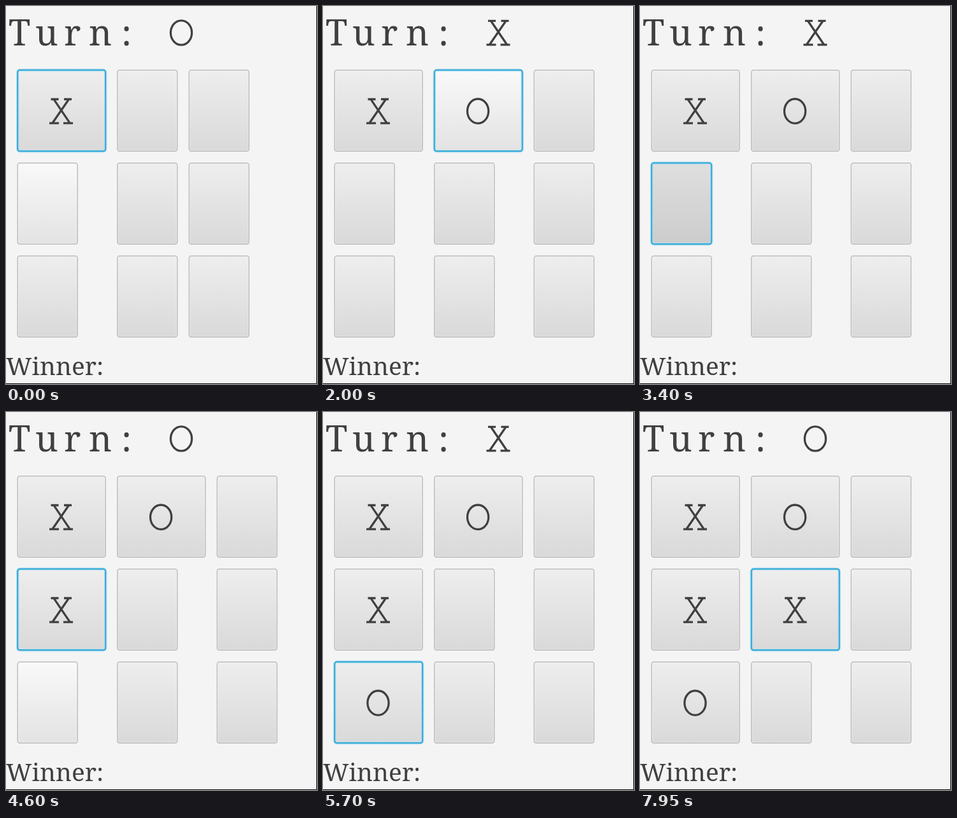
Animation of 488 by 594 pixels, one loop 8 s. Source, as an HTML page:

```html
<!DOCTYPE html>
<html lang="en">
<head>
<meta charset="utf-8">
<title>Tic-tac-toe</title>
<style>
  html, body { margin: 0; width: 100%; height: 100%; overflow: hidden; background: #f4f4f4; }
  svg { display: block; }
  text { font-family: "Noto Serif", serif; fill: #404040; }
  .turn { font-size: 56px; font-weight: 200; }
  .winner { font-size: 38.8px; }
  .mark { fill: none; stroke: #404040; stroke-width: 3.3; }
</style>
</head>
<body>
<svg width="488" height="594" viewBox="0 0 488 594">
  <defs>
    <linearGradient id="normal" x2="0" y2="1"><stop stop-color="#eeeeee"/><stop offset="1" stop-color="#d9d9d9"/></linearGradient>
    <linearGradient id="hover" x2="0" y2="1"><stop stop-color="#f9f9f9"/><stop offset="1" stop-color="#e3e3e3"/></linearGradient>
    <linearGradient id="pressed" x2="0" y2="1"><stop stop-color="#dfdfdf"/><stop offset="1" stop-color="#cccccc"/></linearGradient>
    <path id="X" class="mark" d="M-16-18.7h12M4.5-18.7h12M-18.5 18.9h15M3.5 18.9h15M-11.5-18.5L13.5 18.5M12-18.5L-13.5 18.5"/>
    <ellipse id="O" class="mark" rx="16.6" ry="19.2"/>
  </defs>
  <rect width="488" height="594" fill="#f4f4f4"/>
  <text class="turn" x="4 46 91 130 181" y="62">Turn:</text>
  <use id="turn" x="275" y="42"/>
  <g id="board"></g>
  <text class="winner" x="0" y="580">Winner:</text>
  <path d="M487.5 0V593.5H0" fill="none" stroke="#000"/>
</svg>
<script>
const LOOP = 8000;
const NARROW = 94, WIDE = 138, HEIGHT = 127.5;

// start time, cells, focused cell, cell under the pointer, pointer held down
const states = [
  [0,    'X........', 0, 3],
  [1050, 'X........', 0],
  [1150, 'X........', 0, 1],
  [1350, 'X........', 1, 1, true],
  [1450, 'XO.......', 1, 1],
  [2400, 'XO.......', 1],
  [2550, 'XO.......', 1, 3],
  [3400, 'XO.......', 3, 3, true],
  [3450, 'XO.X.....', 3, 3],
  [4000, 'XO.X.....', 3],
  [4600, 'XO.X.....', 3, 6],
  [4800, 'XO.X.....', 6, 6, true],
  [4950, 'XO.X..O..', 6, 6],
  [5350, 'XO.X..O..', 6],
  [5450, 'XO.X..O..', 6, 7],
  [5650, 'XO.X..O..', 6],
  [6900, 'XO.X..O..', 6, 4],
  [7750, 'XO.X..O..', 4, 4, true],
  [7850, 'XO.XX.O..', 4, 4],
  [7950, 'XO.XX.O..', 4]
];

const board = document.getElementById('board');
const turn = document.getElementById('turn');

function button(x, y, width, fill, focused, mark) {
  const box = (inset, attrs) =>
    `<rect x="${x + inset}" y="${y + inset}" width="${width - 2 * inset}" height="${HEIGHT - 2 * inset}" ${attrs}/>`;
  const border = focused
    ? box(0, 'rx="4" fill="none" stroke="#a9dcf0" stroke-opacity=".7" stroke-width="4.6"') +
      box(0, 'rx="3.5" fill="none" stroke="#36abd8" stroke-width="2.2"')
    : box(0, 'rx="3.5" fill="none" stroke="#bdbdbd" stroke-width="1.5"');
  const symbol = mark === '.' ? '' :
    `<use href="#${mark}" x="${x + width / 2 - .7}" y="${y + 64.5}"/>`;
  return box(0, `rx="4" fill="url(#${fill})"`) +
    box(1.2, 'rx="3" fill="none" stroke="#fff" stroke-opacity=".4"') + border + symbol;
}

function draw([, cells, focus, hover, down]) {
  const marked = [...cells].filter(c => c !== '.').length;
  turn.setAttribute('href', marked % 2 ? '#O' : '#X');
  const lastColumn = cells[1] + cells[4] + cells[7] === '...' ? 287.3 : 331.3;
  const columns = [18.2, 174.8, lastColumn];
  board.innerHTML = [...cells].map((mark, i) => {
    const fill = i !== hover ? 'normal' : down ? 'pressed' : 'hover';
    return button(columns[i % 3], 100.7 + 146 * Math.floor(i / 3),
      mark === '.' ? NARROW : WIDE, fill, i === focus, mark);
  }).join('');
}

let shown;
function frame() {
  const time = performance.now() % LOOP;
  const state = states.findLast(s => s[0] <= time);
  if (state !== shown) draw(shown = state);
  requestAnimationFrame(frame);
}
frame();
</script>
</body>
</html>
```
